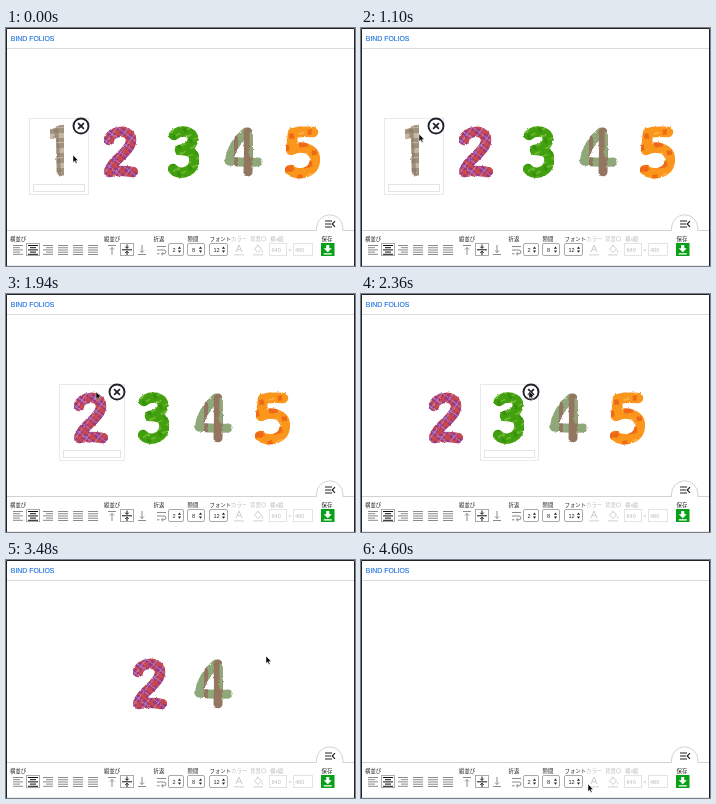
An HTML page for the animation above (4.7 s loop, 349 px wide and 238 px high).

```html
<!DOCTYPE html>
<html lang="ja">
<head>
<meta charset="utf-8">
<title>BIND FOLIOS</title>
<style>
html, body { margin: 0; width: 100%; height: 100%; overflow: hidden; background: #fff; }
svg { display: block; }
text { font: 5.4px "Noto Sans CJK JP", "Noto Sans CJK", "Noto Sans", sans-serif; fill: #222; }
.title { font: 6.9px "Liberation Sans", Arial, sans-serif; fill: #1a6fe0; stroke: #1a6fe0; stroke-width: .12; }
.num { font: 5.6px "Liberation Sans", Arial, sans-serif; }
.dim { fill: #bbb; }
.ink { fill: none; stroke-linecap: round; stroke-linejoin: round; filter: url(#rough); }
.box { fill: #fff; stroke: #e9e9e9; }
.field { fill: #fff; stroke: #e4e4e4; }
.btn { fill: #fff; stroke: #aaa; }
.icon { fill: none; stroke: #8a8a8a; }
.on { stroke: #111; }
.pale { stroke: #ccc; }

/* click times: 30.21%, 53.19%, 71.91%, 83.83%, 91.91% */
.item, .card { animation: 4.7s step-end infinite; }
#i1 { animation-name: i1; }
#i2 { animation-name: i2; }
#i3 { animation-name: i3; }
#i4 { animation-name: i4; }
#i5 { animation-name: i5; }
@keyframes i1 {
  0% { transform: translateX(23px); visibility: visible; }
  30.21%, 100% { transform: translateX(23px); visibility: hidden; }
}
@keyframes i2 {
  0% { transform: translateX(83px); visibility: visible; }
  30.21% { transform: translateX(53px); }
  53.19% { transform: translateX(82px); }
  71.91% { transform: translateX(112px); }
  83.83% { transform: translateX(141px); visibility: visible; }
  91.91%, 100% { transform: translateX(141px); visibility: hidden; }
}
@keyframes i3 {
  0% { transform: translateX(149px); visibility: visible; }
  30.21% { transform: translateX(119px); visibility: visible; }
  53.19%, 100% { transform: translateX(119px); visibility: hidden; }
}
@keyframes i4 {
  0% { transform: translateX(208px); visibility: visible; }
  30.21% { transform: translateX(178px); }
  53.19% { transform: translateX(148px); }
  71.91% { transform: translateX(178px); visibility: visible; }
  83.83%, 100% { transform: translateX(178px); visibility: hidden; }
}
@keyframes i5 {
  0% { transform: translateX(267px); visibility: visible; }
  30.21% { transform: translateX(237px); }
  53.19% { transform: translateX(207px); visibility: visible; }
  71.91%, 100% { transform: translateX(207px); visibility: hidden; }
}

/* hover cards */
.c2 { animation-name: c2; }
.c3 { animation-name: c3; }
.c4 { animation-name: c4; }
.c5 { animation-name: c5; }
@keyframes c2 { 0%, 43.19%, 100% { opacity: 0; } 30.21%, 87.7% { opacity: 1; } }
@keyframes c3 { 0%, 53.19%, 100% { opacity: 0; } 43.19% { opacity: 1; } }
@keyframes c4 { 0%, 61.4%, 83.83%, 100% { opacity: 0; } 53.19%, 77.6% { opacity: 1; } }
@keyframes c5 { 0%, 71.91%, 100% { opacity: 0; } 61.4% { opacity: 1; } }

#cursor { animation: point 4.7s ease-in-out infinite; }
@keyframes point {
  0%, 2.9% { transform: translate(67px, 127px); }
  8.51%, 14.4% { transform: translate(65px, 123px); }
  23.4% { transform: translate(58px, 106px); }
  24.3%, 26.2% { transform: translate(63px, 100px); }
  27.2%, 38.1% { transform: translate(69px, 98px); }
  48.1%, 50% { transform: translate(167px, 96.5px); }
  50.2%, 59% { transform: translate(168px, 97px); }
  63% { transform: translate(233px, 99px); }
  68.9%, 74.4% { transform: translate(260px, 96px); }
  80.9%, 84.6% { transform: translate(228px, 97px); }
  88.9%, 92% { transform: translate(199px, 97px); }
  97.8%, 100% { transform: translate(227px, 224px); }
}
</style>
</head>
<body>
<svg width="349" height="238" viewBox="0 0 349 238">
  <defs>
    <filter id="rough" x="-20%" y="-20%" width="140%" height="140%">
      <feTurbulence type="fractalNoise" baseFrequency=".3" numOctaves="2" seed="4"/>
      <feDisplacementMap in="SourceGraphic" scale="2.6" xChannelSelector="R" yChannelSelector="G"/>
    </filter>
    <pattern id="p1" width="13" height="15" patternUnits="userSpaceOnUse" patternTransform="rotate(-4)">
      <path fill="#a1907c" d="M0 0h13v15H0z"/>
      <path fill="#c5b8a5" d="M0 2h13v5H0z"/>
      <path fill="#857460" opacity=".6" d="M5 0h4v15H5z"/>
      <path fill="#d8cebf" opacity=".6" d="M0 11h13v1H0z"/>
    </pattern>
    <pattern id="p2" width="9" height="9" patternUnits="userSpaceOnUse" patternTransform="rotate(38)">
      <path fill="#983886" d="M0 0h9v9H0z"/>
      <path fill="#dc4f35" opacity=".8" d="M0 1h9v2.4H0zM5 0h2v9H5z"/>
      <path fill="#c79bd0" opacity=".8" d="M0 6h9v.8H0zM2 0h.8v9H2z"/>
    </pattern>
    <pattern id="p3" width="13" height="12" patternUnits="userSpaceOnUse" patternTransform="rotate(-28)">
      <path fill="#429f0b" d="M0 0h13v12H0z"/>
      <path fill="#7cc344" opacity=".75" d="M1 2h7v2H1zM7 8h5v1.5H7z"/>
      <path fill="#2f8708" opacity=".6" d="M3 6h3v5H3z"/>
    </pattern>
    <pattern id="p4" width="14" height="60" patternUnits="userSpaceOnUse" patternTransform="translate(2)">
      <path fill="#8fa879" d="M0 0h14v60H0z"/>
      <path fill="#937660" d="M4 0h4v60H4z"/>
    </pattern>
    <pattern id="p5" width="19" height="21" patternUnits="userSpaceOnUse" patternTransform="rotate(-12)">
      <path fill="#fb961f" d="M0 0h19v21H0z"/>
      <path fill="#ee6913" d="M1 12h9v6H1zM12 2h5v5h-5z"/>
      <path fill="#ffb64c" d="M3 3h6v1.5H3z"/>
    </pattern>
    <g id="close">
      <circle cy="98" r="7.5" fill="#fff" stroke="#22222c" stroke-width="1.9"/>
      <path d="M-2.9 95.1l5.8 5.8m0-5.8l-5.8 5.8" stroke="#22222c" stroke-width="1.8"/>
    </g>
    <path id="lines" d="M-5 -4.5H5M-5 0H5M-5 4.5H5M-5 -2.25H5M-5 2.25H5"/>
    <path id="spin" d="M-1.6 -.9L0 -3.1 1.6 -.9zM-1.6 .9L0 3.1 1.6 .9z"/>
  </defs>

  <text class="title" x="4.8" y="13.4">BIND FOLIOS</text>
  <path d="M0 20.5H349" stroke="#dcdcdc"/>

  <g id="i1" class="item">
    <g><rect class="box" x=".5" y="90.5" width="59" height="76"/><rect class="field" x="4.5" y="156.5" width="51" height="7"/></g>
    <path class="ink" stroke="url(#p1)" stroke-width="10" d="M23 106Q29 105 32 102L32.5 143"/>
    <use href="#close" x="52"/>
  </g>
  <g id="i2" class="item">
    <g class="card c2"><rect class="box" x=".5" y="90.5" width="65" height="76"/><rect class="field" x="4.5" y="156.5" width="57" height="7"/></g>
    <path class="ink" stroke="url(#p2)" stroke-width="10.5" d="M20 112C21 102 43 100 42 113C41 125 22 132 20 144Q32 142 44 144"/>
    <g class="card c2"><use href="#close" x="58"/></g>
  </g>
  <g id="i3" class="item">
    <g class="card c3"><rect class="box" x=".5" y="90.5" width="58" height="76"/><rect class="field" x="4.5" y="156.5" width="50" height="7"/></g>
    <path class="ink" stroke="url(#p3)" stroke-width="10.5" d="M19 107C26 101 39 103 38 112C37 119 30 121 25 122C36 121 41 127 39 135C36 146 23 147 18 141"/>
    <g class="card c3"><use href="#close" x="51"/></g>
  </g>
  <g id="i4" class="item">
    <g class="card c4"><rect class="box" x=".5" y="90.5" width="58" height="76"/><rect class="field" x="4.5" y="156.5" width="50" height="7"/></g>
    <g class="ink" stroke-width="9">
      <path stroke="url(#p4)" d="M32 104C24 111 17 121 15 133Q30 135 44 134"/>
      <path stroke="#937660" d="M34 104Q35 124 34 144"/>
      <path stroke="#8fa879" stroke-width="3" d="M37 105V128M39 134H45"/>
    </g>
    <g class="card c4"><use href="#close" x="51"/></g>
  </g>
  <g id="i5" class="item">
    <g class="card c5"><rect class="box" x=".5" y="90.5" width="59" height="76"/><rect class="field" x="4.5" y="156.5" width="51" height="7"/></g>
    <path class="ink" stroke="url(#p5)" stroke-width="10.5" d="M40 104Q29 103 20 105L18 122C28 117 42 120 42 132C41 146 25 148 17 142"/>
    <g class="card c5"><use href="#close" x="52"/></g>
  </g>

  <!-- toolbar -->
  <path d="M0 202.5H310.5V200A13.2 13.2 0 0 1 336.9 200V202.5H349V238H0z" fill="#fff" stroke="#d2d2d2"/>
  <path d="M319 193H326M319 196H325M319 199H326M329 193.2L326.2 196 329 198.8" fill="none" stroke="#222" stroke-width="1.2"/>

  <text x="4" y="213">横並び</text>
  <text x="98" y="213">縦並び</text>
  <text x="147.5" y="213">折返</text>
  <text x="181.5" y="213">隙間</text>
  <text x="203.5" y="213" textLength="none">フォント</text>
  <text class="dim" x="225" y="213">カラー</text>
  <text class="dim" x="244" y="213">背景</text>
  <rect class="icon pale" x="255.5" y="208.8" width="4" height="4" rx=".8" stroke-width=".7"/>
  <text class="dim" x="264" y="213">横x縦</text>
  <text x="315.5" y="213">保存</text>

  <rect class="btn" x="20.5" y="215.5" width="13" height="12"/>
  <rect class="btn" x="114.5" y="215.5" width="13" height="12"/>
  <g class="icon">
    <path d="M7 217.5H17M7 219.7H14M7 221.9H17M7 224.1H14M7 226.3H17"/>
    <path class="on" d="M22 217.5H32M24 219.7H30M22 221.9H32M24 224.1H30M22 226.3H32"/>
    <path d="M37 217.5H47M40 219.7H47M37 221.9H47M40 224.1H47M37 226.3H47"/>
    <use href="#lines" x="57" y="222"/>
    <use href="#lines" x="72" y="222"/>
    <use href="#lines" x="87" y="222"/>
    <path d="M102 217.5H110M106 227V219.5M104 221.5L106 219.5 108 221.5"/>
    <path class="on" d="M116 221.8H126M121 216.5V220M121 227V223.5M119.3 218.7L121 220.4 122.7 218.7M119.3 224.9L121 223.2 122.7 224.9"/>
    <path d="M132 226.5H140M136 217V224.5M134 222.5L136 224.5 138 222.5"/>
    <path d="M151 218.5H160M151 222H158A1.9 1.9 0 0 1 158 225.8H155.5M157 224.2L155.4 225.8 157 227.4M151 225.8H153.5"/>
  </g>

  <g class="btn">
    <rect x="162.5" y="215.5" width="15" height="12" rx="1.5"/>
    <rect x="181.5" y="215.5" width="17" height="12" rx="1.5"/>
    <rect x="203.5" y="215.5" width="18" height="12" rx="1.5"/>
  </g>
  <text class="num" x="166.5" y="223.7">2</text>
  <text class="num" x="186" y="223.7">8</text>
  <text class="num" x="207.5" y="223.7">12</text>
  <g fill="#222">
    <use href="#spin" x="173.5" y="221.7"/>
    <use href="#spin" x="194.5" y="221.7"/>
    <use href="#spin" x="217.5" y="221.7"/>
  </g>

  <g class="icon pale">
    <path d="M230 224L233 217 236 224M231.2 221.7H234.8"/>
    <path d="M228 226.8H238" stroke-width="1.6" stroke="#e2e2e2"/>
    <path d="M248.5 221L252 217.5 255.5 221 252 224.5zM251 216.5L253 218.5M256.5 222.5V224.5"/>
    <path d="M247 226.8H257" stroke-width="1.6" stroke="#e2e2e2"/>
  </g>
  <rect class="field" x="263.5" y="215.5" width="17" height="12"/>
  <rect class="field" x="287.5" y="215.5" width="19" height="12"/>
  <text class="num dim" x="265.5" y="223.7">640</text>
  <text class="num dim" x="282.3" y="223.7">×</text>
  <text class="num dim" x="289" y="223.7">480</text>

  <rect x="315" y="215" width="13.5" height="13" fill="#07a016"/>
  <path d="M320.2 217H323.3V220.3H325.8L321.75 224.2 317.7 220.3H320.2zM317.7 225.2H325.8V226.5H317.7z" fill="#fff"/>

  <path d="M.5 238V.5H348.5V238" fill="none" stroke="#222"/>
  <path id="cursor" d="M0 0V7.4L1.7 5.9 2.9 8.6 4.1 8.1 2.9 5.4H5.2z" fill="#000" stroke="#fff" stroke-width=".5"/>
</svg>
</body>
</html>
```
